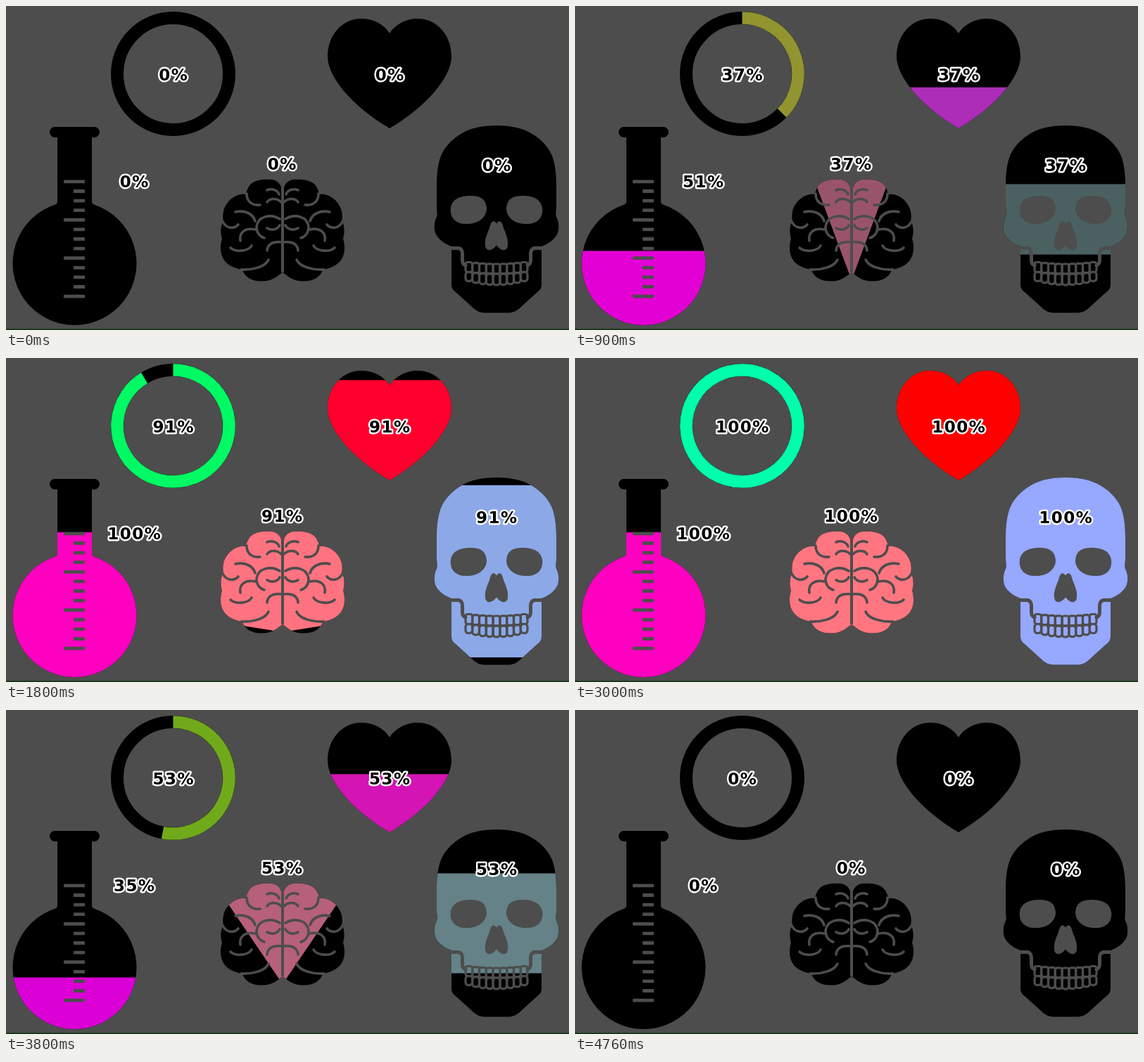
Animation of 800 by 461 pixels, one loop 5040 ms. Source, as an HTML page:

```html
<!DOCTYPE html>
<html lang="en">
<head>
<meta charset="utf-8">
<title>Progress shapes</title>
<style>
  html, body { margin: 0; width: 100%; height: 100%; overflow: hidden; background: #4d4d4d; }
  svg { display: block; width: 100%; height: 100%; }
  text {
    font: bold 23px "DejaVu Sans", sans-serif; letter-spacing: 1.5px;
    text-anchor: middle;
    fill: #000; stroke: #fff; stroke-width: 5; stroke-linejoin: round; paint-order: stroke;
  }
  .gap { fill: #4d4d4d; }
  .line { fill: none; stroke: #4d4d4d; stroke-linecap: round; stroke-linejoin: round; }
</style>
</head>
<body>
<svg viewBox="0 0 800 461" preserveAspectRatio="none">
  <defs>
    <path id="heart" d="M545 39 C537 26 522 18 505 18 C478 18 457 41 457 72 C457 102 495 145 545 174 C595 145 633 102 633 72 C633 41 612 18 585 18 C568 18 553 26 545 39Z"/>
    <path id="flask" d="M69.500 172 H125.500 A7.500 7.500 0 0 1 125.500 187 H122 V278 Q122 281 125 282.500 A88 88 0 1 1 70 282.500 Q73 281 73 278 V187 H69.500 A7.500 7.500 0 0 1 69.500 172Z"/>
    <path id="lobe" d="M393 258 H391 C388 249 380 246 372 247 C359 246 347 251 344 259 C342 263 341 266 341 268 C328 266 313 276 309 292 C308 298 308 302 309 306 C304 313 305 325 307 331 C302 348 306 364 322 371 C328 374 333 374 336 376 C341 388 352 392 364 391.500 C376 392 384 386 390 381 L393 380Z"/>
    <g id="brain">
      <use href="#lobe"/>
      <use href="#lobe" transform="matrix(-1 0 0 1 786 0)"/>
    </g>
    <path id="folds" class="line" stroke-width="3.6" d="M342 267 C342 279 350 284 361 283 M371 262 C378 259 386 262 388 268 M371 279 C375 273 385 273 391 279 M326 293 C338 290 351 295 354 306 M389 303 C376 295 358 299 356 314 C356 322 360 328 367 330 M371 316 C378 320 386 318 389 312 M308 307 C314 318 325 317 330 311 M333 334 C331 322 340 315 354 318 M319 344 C325 350 344 350 349 341 M371 348 C372 338 380 335 391 336 M334 375 C350 376 369 371 373 361"/>
    <path id="skullHalf" d="M697.500 170 C675 170 660 174 648 181 C636 188 625 198 619 211 C614 222 612 238 612 254 V285 C612 293 614 297 611 302 C608 309 608 319 611 325 C616 334 625 339 633 342 V396 C633 402 636 405 640 408 L661 427 C668 434 673 436.500 681 436.500 H697.500Z"/>
    <g id="skull">
      <use href="#skullHalf"/>
      <use href="#skullHalf" transform="matrix(-1 0 0 1 1394 0)"/>
    </g>
    <g id="face">
      <path class="gap" d="M632 287 C634 275 645 270 660 270 C675 270 682 275 683 288 C683 300 672 310 656 310 C640 311 630 302 632 287Z"/>
      <path class="gap" d="M697.300 310 C693 303 689 306 687 316 C683 326 680 332 681 341 C682 349 690 350 697.300 340Z"/>
      <path class="line" stroke-width="5" d="M632 344.500 H643 Q648.500 346 648.500 352 V362 Q649 368 653 369"/>
    </g>
    <clipPath id="heartClip"><use href="#heart"/></clipPath>
    <clipPath id="flaskClip"><use href="#flask"/></clipPath>
    <clipPath id="skullClip">
      <use href="#skullHalf"/>
      <use href="#skullHalf" transform="matrix(-1 0 0 1 1394 0)"/>
    </clipPath>
    <clipPath id="wedgeClip"><path id="wedge"/></clipPath>
  </defs>

  <rect width="800" height="461" fill="#4d4d4d"/>
  <rect y="459.500" width="800" height="1.500" fill="#0b300e"/>

  <circle cx="237.500" cy="96.500" r="79.500" fill="none" stroke="#000" stroke-width="18"/>
  <path id="arc" fill="none" stroke-width="17.600"/>

  <use href="#heart"/>
  <rect id="heartFill" x="450" width="190" clip-path="url(#heartClip)"/>

  <use href="#flask"/>
  <rect id="flaskFill" x="0" width="200" clip-path="url(#flaskClip)"/>
  <g id="marks" class="gap"></g>

  <use href="#brain"/>
  <g clip-path="url(#wedgeClip)"><use id="brainFill" href="#brain"/></g>
  <use href="#folds"/>
  <use href="#folds" transform="matrix(-1 0 0 1 786 0)"/>
  <path class="line" stroke-width="4" d="M393 246 V378"/>

  <use href="#skull"/>
  <rect id="skullFill" x="600" width="195" clip-path="url(#skullClip)"/>
  <use href="#face"/>
  <use href="#face" transform="matrix(-1 0 0 1 1394 0)"/>
  <g id="teeth" class="line" stroke-width="3.200"></g>

  <text id="ringText" x="238.200" y="105.500"></text>
  <text id="heartText" x="545.700" y="105.500"></text>
  <text id="flaskText" x="182.700" y="257.500"></text>
  <text id="brainText" x="392.700" y="232.500"></text>
  <text id="skullText" x="697.700" y="234.500"></text>
</svg>
<script>
const LOOP = 5040, RATE = 0.06, FLASK_GAIN = 1.37;
const $ = id => document.getElementById(id);
const clamp = v => Math.max(0, Math.min(100, v));

function add(parent, name, attrs) {
  const el = document.createElementNS('http://www.w3.org/2000/svg', name);
  set(el, attrs);
  parent.appendChild(el);
}
function set(el, attrs) {
  for (const k in attrs) el.setAttribute(k, attrs[k]);
}

// Flask scale: every fourth mark is long
for (let i = 0; i < 13; i++) {
  const long = i % 4 === 0;
  add($('marks'), 'rect', {
    x: long ? 82 : 96, y: 247.5 + i * 13.6, width: long ? 30 : 16, height: 4.8, rx: 1
  });
}

// Two rows of teeth on a shallow curve
for (let i = 0; i < 9; i++) {
  const u = (i - 4) / 4, x = 653 + i * 9.8, y = 367 - 2.5 * u * u;
  add($('teeth'), 'rect', { x, y, width: 9.6, height: 14, rx: 3 });
  add($('teeth'), 'rect', { x, y: y + 14, width: 9.6, height: 16 - 3 * u * u, rx: 4 });
}

// Colour ramps at these percentages
const STOPS = [0, 37, 53, 69, 91, 100];
const RAMPS = {
  ring: ['b46a50', '93932f', '70aa1a', '00cc08', '00fa60', '00ffaa'],
  heart: ['6a50b4', 'ac2db8', 'd414b4', 'f00094', 'ff0030', 'ff0000'],
  brain: ['6a4458', '98546c', 'b6607a', 'd46880', 'ff7380', 'ff7680'],
  skull: ['28322e', '4a6060', '648287', '769eb2', '8ca8e6', '96a8ff'],
  flask: ['c400d8', 'dc00d6', 'e400d4', 'f000d0', 'fa00cc', 'ff00c0']
};

function color(name, p) {
  let i = 0;
  while (i < 4 && p > STOPS[i + 1]) i++;
  const f = (p - STOPS[i]) / (STOPS[i + 1] - STOPS[i]);
  const part = (hex, k) => parseInt(hex.substr(k * 2, 2), 16);
  const [a, b] = [RAMPS[name][i], RAMPS[name][i + 1]];
  return 'rgb(' + [0, 1, 2].map(k => Math.round(part(a, k) + (part(b, k) - part(a, k)) * f)) + ')';
}

function polar(cx, cy, r, deg) {
  const a = deg * Math.PI / 180;
  return (cx + r * Math.sin(a)).toFixed(2) + ' ' + (cy - r * Math.cos(a)).toFixed(2);
}
function arcPath(cx, cy, r, from, to) {
  return `${polar(cx, cy, r, from)} A${r} ${r} 0 ${to - from > 180 ? 1 : 0} 1 ${polar(cx, cy, r, to)}`;
}

function levels(t) {
  if (t < 320) return [0, 0];
  if (t <= 3000) {
    const d = (t - 277) * RATE;
    return [clamp(d), clamp(d * FLASK_GAIN)];
  }
  const d = (t - 3017) * RATE;
  return [clamp(100 - d), clamp(100 - d * FLASK_GAIN)];
}

function draw(time) {
  const [p, q] = levels(Math.floor((time % LOOP) / 20) * 20);

  set($('arc'), {
    d: p > 0 ? 'M' + arcPath(237.5, 96.5, 79.5, 0, Math.min(p * 3.6, 359.99)) : '',
    stroke: color('ring', p)
  });

  const rise = 1.56 * p;
  set($('heartFill'), { y: 174 - rise, height: rise, fill: color('heart', p) });

  const level = 2.06 * q;
  set($('flaskFill'), { y: 454 - level, height: level + (q > 0 ? 1 : 0), fill: color('flask', q) });

  const spread = 2.68 * p;
  set($('skullFill'), { y: 303.5 - spread / 2, height: spread, fill: color('skull', p) });

  const half = p >= 100 ? 179.9 : p * (0.31 + 0.0063 * p);
  set($('wedge'), { d: p > 0 ? 'M393 390 L' + arcPath(393, 390, 300, -half, half) + 'Z' : '' });
  set($('brainFill'), { fill: color('brain', p) });

  for (const id of ['ring', 'heart', 'brain', 'skull']) $(id + 'Text').textContent = Math.floor(p) + '%';
  $('flaskText').textContent = Math.floor(q) + '%';
}

const start = performance.now();
function tick() {
  draw(performance.now() - start);
  requestAnimationFrame(tick);
}
tick();
</script>
</body>
</html>
```
